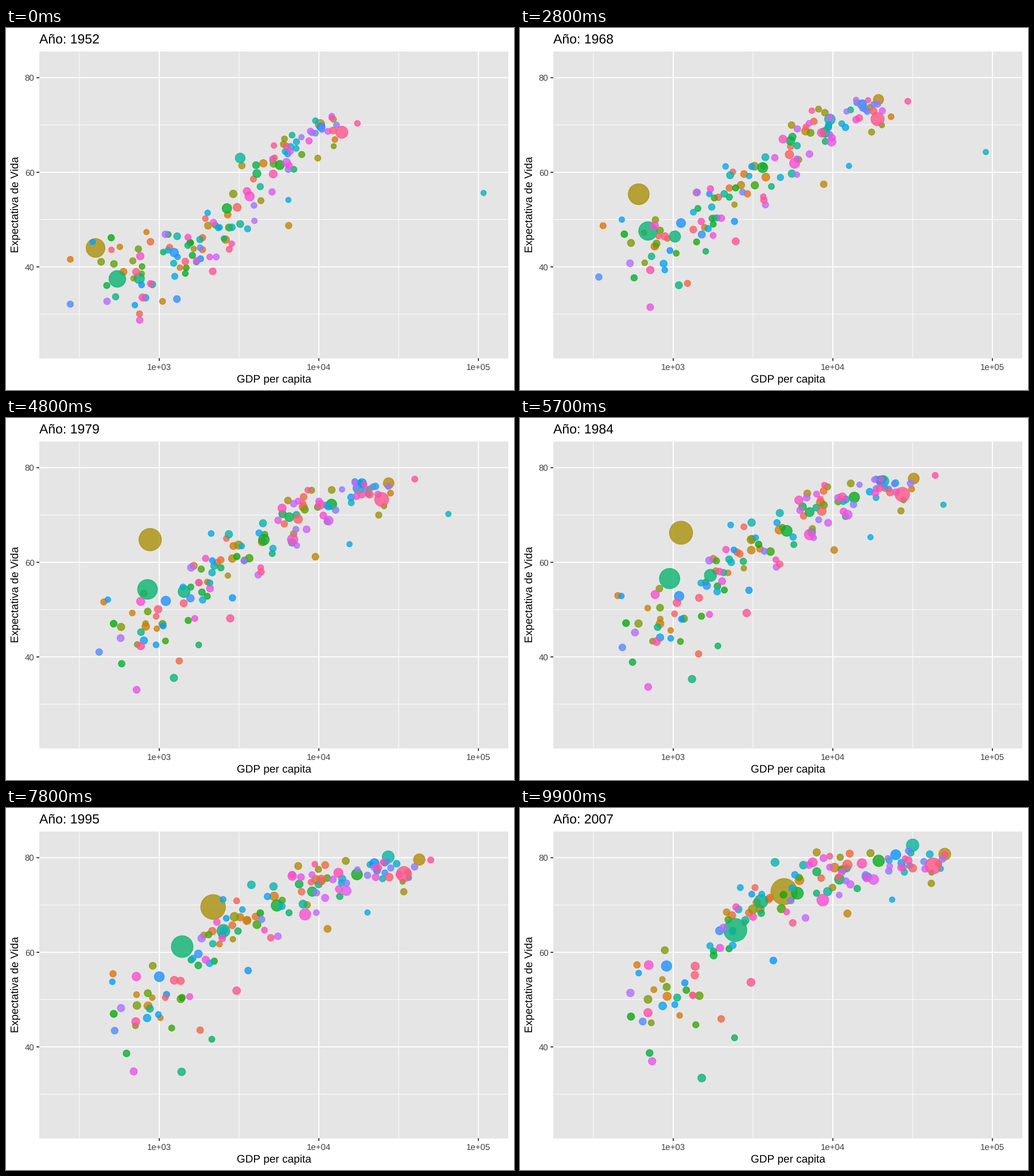
Write a matplotlib script that moves like this. It is 885 px wide and 632 px high and loops after 10 s.

```python
import numpy as np
import matplotlib.pyplot as plt
from matplotlib.animation import FuncAnimation

W, H, DPI = 885, 632, 100
FRAMES, STEP = 100, 9          # one survey every 9 frames
PX = 72 / DPI                  # points per pixel
N = 142
plt.rcParams.update({"font.family": "Liberation Sans", "text.hinting": "none",
                     "text.hinting_factor": 1})

# The most conspicuous bubbles: hue index -> millions, key points of the path
KEY_TIMES = (0, 15, 40, 70, 99)
LEADERS = {
    24: (556, [(156, 384), (187, 363), (225, 223), (323, 183), (460, 146)]),
    58: (400, [(194, 438), (211, 396), (234, 316), (281, 253), (375, 213)]),
    134: (150, [(585, 182), (600, 169), (644, 150), (683, 121), (720, 101)]),
    59: (88, [(232, 437), (247, 403), (291, 328), (363, 234), (420, 163)]),
    66: (70, [(408, 227), (477, 188), (598, 133), (659, 93), (684, 65)]),
    71: (0.5, [(832, 288), (824, 254), (800, 182), (690, 128), (733, 106)]),
}
GROWTH = 2.37


def hue_colour(i):
    """Evenly spaced hue in polar LUV at chroma 100, luminance 65."""
    h = np.radians(15 + 360 * i / N)
    L, C = 65, 100
    Y = ((L + 16) / 116) ** 3
    u = C * np.cos(h) / (13 * L) + 0.1978
    v = C * np.sin(h) / (13 * L) + 0.4683
    X = 9 * Y * u / (4 * v)
    Z = -X / 3 - 5 * Y + 3 * Y / v
    lin = np.array([[3.2405, -1.5371, -0.4985],
                    [-0.9693, 1.8760, 0.0416],
                    [0.0556, -0.2040, 1.0572]]) @ (X, Y, Z)
    lin = np.clip(lin, 0, 1)
    rgb = np.where(lin > 0.00304, 1.055 * lin ** (1 / 2.4) - 0.055, 12.92 * lin)
    return (*np.clip(rgb ** 1.22, 0.04, 1), 0.8)


def diameter(millions):
    size = 2 + 10 * np.sqrt(millions / 1319)
    return (size * 2.845 + 0.945) * 1.307


def smooth(u, lo, hi):
    t = np.clip((u - lo) / (hi - lo), 0, 1)
    return t * t * (3 - 2 * t)


def start_point(u):
    return np.array([165 + 410 * u, 430 - 262 * smooth(u, 0.2, 1)])


def end_point(u):
    return np.array([195 + 515 * u, 350 - 165 * smooth(u, 0.1, 0.5) - 100 * u])


def build_tracks():
    rng = np.random.default_rng(52)
    knots = np.arange(0, FRAMES, STEP)
    t = knots / knots[-1]
    ease = (t ** 0.65)[:, None]
    pos = np.zeros((FRAMES, N, 2))
    pop = np.exp(rng.normal(1.5, 1.1, N)).clip(0.2, 60)

    def place(i, times, path):
        for axis, values in enumerate(np.transpose(path)):
            pos[:, i, axis] = np.interp(np.arange(FRAMES), times, values)

    for i, (millions, path) in LEADERS.items():
        pop[i] = millions
        place(i, KEY_TIMES, path)

    # Everyone else follows a wealth rank u; poorer ranks scatter more widely
    others = rng.permutation([i for i in range(N) if i not in LEADERS])
    for rank, i in enumerate(others):
        u = (rank + 0.5) / len(others)
        u0, u1 = np.clip(u + rng.normal(0, 0.06, 2), -0.08, 1.06)
        spread = np.array([28, 40]) * (1 - u) + (6, 7)
        n0, n1 = rng.normal(size=(2, 2)).clip(-1.8, 1.8)
        a = start_point(u0) + spread * n0
        b = end_point(u1) + spread * (0.5 * n0 + 0.9 * n1)
        if rank % 10 == 4:     # rich for their life expectancy
            a[0] += 70
            b += (90, 60 * (1 - u))
        walk = np.cumsum(rng.normal(0, (5, 3), (len(t), 2)), axis=0)
        bridge = walk - walk[0] - (walk[-1] - walk[0]) * t[:, None]
        place(i, knots, np.clip(a + (b - a) * ease + bridge, (112, 64), (740, 510)))
    return pos, diameter(pop), diameter(pop * GROWTH)


POS, DIAM_START, DIAM_END = build_tracks()

fig = plt.figure(figsize=(W / DPI, H / DPI), dpi=DPI, facecolor="white")
ax = fig.add_axes([0, 0, 1, 1])
ax.set_xlim(0, W)
ax.set_ylim(H, 0)
ax.axis("off")

LEFT, RIGHT, TOP, BOTTOM = 58, 875, 41, 576.5
ax.add_patch(plt.Rectangle((LEFT, TOP), RIGHT - LEFT, BOTTOM - TOP,
                           fc="#e5e5e5", lw=0, zorder=0))


def line(xs, ys, width, colour="white"):
    ax.plot(xs, ys, color=colour, lw=width * PX, solid_capstyle="butt",
            snap=False, zorder=1)


def label(x, y, s, px, colour="black", **kw):
    kw.setdefault("va", "baseline")
    return ax.text(x, y, s, fontsize=px * PX, color=colour, **kw)


def x_of(power):
    return 267 + 278 * (power - 3)


def y_of(years):
    return 251.9 - 8.26 * (years - 60)


for power in (2.5, 3.5, 4.5):
    line([x_of(power)] * 2, (TOP, BOTTOM), 0.93)
for years in (30, 50, 70):
    line((LEFT, RIGHT), [y_of(years)] * 2, 0.93)
for power in (3, 4, 5):
    x = x_of(power)
    line((x, x), (TOP, BOTTOM), 1.86)
    line((x, x), (BOTTOM, BOTTOM + 4.8), 1.86, "#333333")
    label(x, 597, f"1e+0{power}", 15.3, "#404040", ha="center")
for years in (40, 60, 80):
    y = y_of(years)
    line((LEFT, RIGHT), (y, y), 1.86)
    line((LEFT - 4.8, LEFT), (y, y), 1.86, "#333333")
    label(49.5, y + 5.5, str(years), 15.3, "#404040", ha="right")

label(466.5, 619, "GDP per capita", 19.2, ha="center")
label(17, 308.5, "Expectativa de Vida", 19.2, ha="center", va="center", rotation=90)
title = label(58, 26.5, "", 23)

colours = [hue_colour(i) for i in range(N)]
dots = ax.scatter(POS[0, :, 0], POS[0, :, 1], c=colours, edgecolors=colours,
                  linewidths=1.24 * PX, zorder=3)


def update(n):
    t = n / (FRAMES - 1)
    dots.set_offsets(POS[n])
    dots.set_sizes(((DIAM_START + (DIAM_END - DIAM_START) * t) * PX) ** 2)
    title.set_text(f"Año: {round(1952 + 55 * t)}")
    return dots, title


anim = FuncAnimation(fig, update, frames=FRAMES, interval=100,
                     init_func=lambda: update(0), repeat=True, repeat_delay=0)
plt.show()
```
